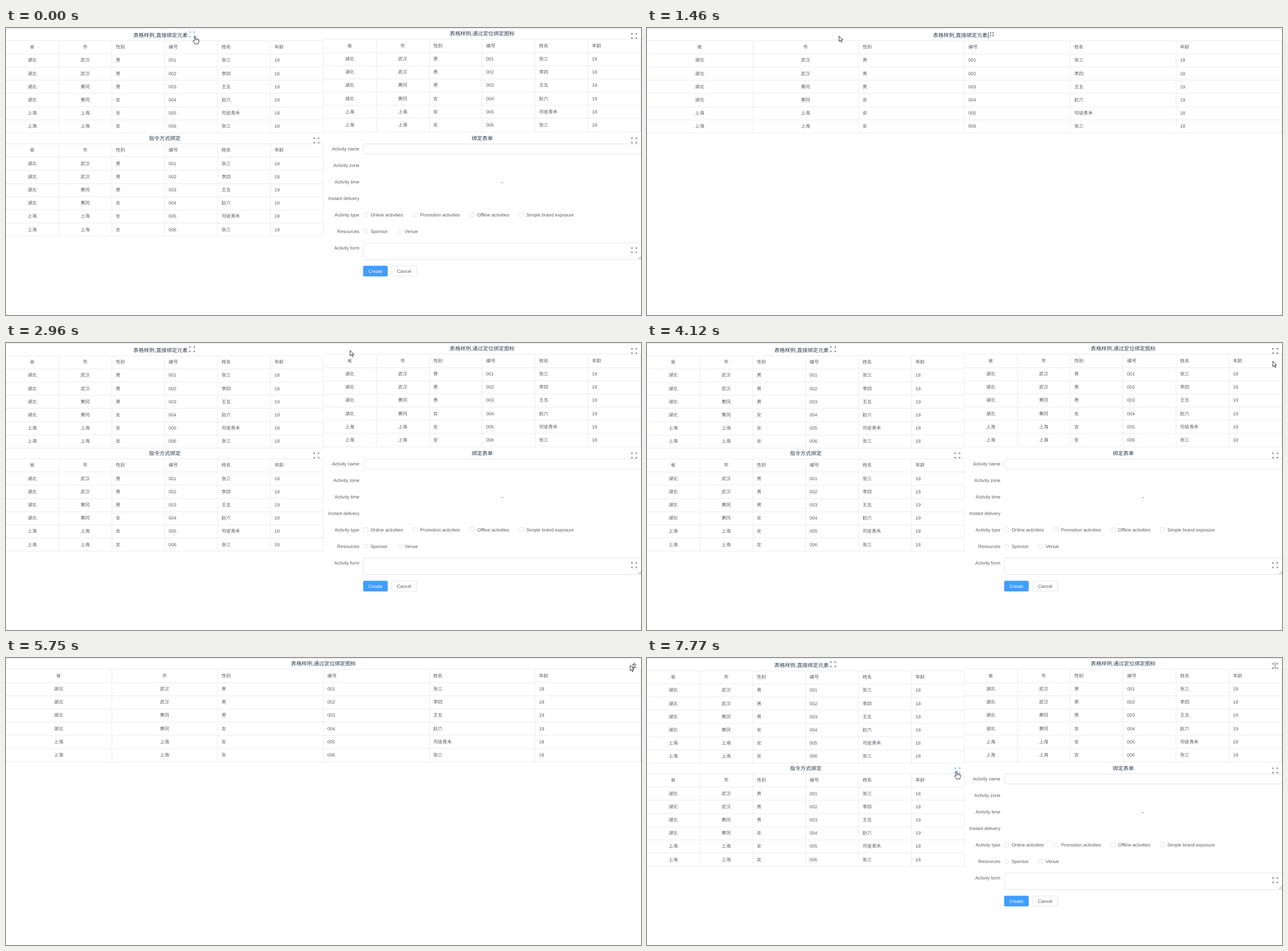
Recreate the animation shown at these times as an HTML page. Size 1112x504 px, loop 8000 ms.

```html
<!DOCTYPE html>
<html lang="zh-CN">
<head>
<meta charset="utf-8">
<title>Fullscreen panels</title>
<style>
  html, body { margin: 0; width: 100%; height: 100%; overflow: hidden; background: #fff; }
  svg { display: block; width: 1112px; height: 504px; }
  text {
    font: 8.1px "Liberation Sans", "Noto Sans CJK SC", "Noto Sans CJK", sans-serif;
    fill: #5a5d63; white-space: pre; text-rendering: geometricPrecision;
  }
  .title { font-size: 9.27px; fill: #2c3e50; }
  .mid { text-anchor: middle; }
  .end { text-anchor: end; }
  .white { fill: #fff; }
  .rule { fill: #ebedf1; }
  .box { fill: #fff; stroke: #dcdfe6; stroke-width: .8; }
  .icon { fill: none; stroke: #4a5868; stroke-width: .75; }
  .icon.hover { stroke: #409eff; }
  .cursor { fill: #fff; stroke: #222; stroke-width: .9; stroke-linejoin: round; }
  .cursor .crease { fill: none; stroke-width: .6; }
</style>
</head>
<body>
<svg id="stage" viewBox="0 0 1112 504"></svg>
<script>
const stage = document.getElementById('stage');

function add(parent, tag, attrs, text) {
  const el = document.createElementNS(stage.namespaceURI, tag);
  for (const k in attrs) el.setAttribute(k, attrs[k]);
  if (text) el.textContent = text;
  parent.append(el);
  return el;
}
const group = (parent = stage, attrs = {}) => add(parent, 'g', attrs);
const rect = (g, x, y, width, height, cls, extra) =>
  add(g, 'rect', { x, y, width, height, class: cls, ...extra });
// y is the visual middle of the line of text
const label = (g, x, y, text, cls = '') =>
  add(g, 'text', { x, y: y + (cls.includes('title') ? 3.2 : 2.7), class: cls }, text);

const EXPAND = 'M-4.6-2.4V-4.6H-2.4M-4.4-4.4L-2.3-2.3';
const SHRINK = 'M-1.5-3.7V-1.5H-3.7M-1.7-1.7L-4-4';
function icon(g, x, y, shape = EXPAND) {
  const el = group(g, { class: 'icon', transform: `translate(${x} ${y})` });
  for (let a = 0; a < 360; a += 90) add(el, 'path', { d: shape, transform: `rotate(${a})` });
  return { el, x, y };
}

const TABLE = `省 市 性别 编号 姓名 年龄
湖北 武汉 男 001 张三 18
湖北 武汉 男 002 李四 18
湖北 黄冈 男 003 王五 19
湖北 黄冈 女 004 赵六 19
上海 上海 女 005 司徒青禾 18
上海 上海 女 006 张三 18`.split('\n').map(row => row.split(' '));
const ROW_H = 23.17;

function table(g, left, top, width) {
  const col = width / 6;
  const lineY = i => Math.round(top + i * ROW_H);
  for (let i = 0; i <= 7; i++) rect(g, left, lineY(i), width, 1, 'rule');
  for (let i = 1; i <= 6; i++)
    rect(g, Math.floor(left + i * col - .2), lineY(0), 1, lineY(7) - lineY(0), 'rule');
  TABLE.forEach((row, r) => row.forEach((cell, c) => {
    const y = top + (r + .5) * ROW_H + .2;
    if (c < 2) label(g, left + (c + .5) * col - .5, y, cell, 'mid');
    else label(g, left + c * col + 6.8, y, cell);
  }));
}

function inlinePanel(g, width, shape) {
  label(g, width / 2 - 55, 12.5, '表格样例,直接绑定元素', 'title');
  table(g, 0, 21.7, width);
  return icon(g, width / 2 + 47.8, 11, shape);
}

function pinnedPanel(g, left, width, shape) {
  label(g, left + width / 2, 10, '表格样例,通过定位绑定图标', 'title mid');
  table(g, left, 19.4, width);
  return icon(g, 1100, 14, shape);
}

// Checkboxes or radios in a row, each as wide as its text
function choices(g, y, names, radius) {
  let x = 626;
  for (const name of names) {
    rect(g, x, y - 4.2, 7.6, 7.6, 'box', { rx: radius });
    x += 12.4 + label(g, x + 12.4, y, name).getComputedTextLength() + 17.4;
  }
}

function form(g) {
  const rowY = i => 212.3 + i * 29;
  label(g, 834, 193.5, '绑定表单', 'title mid');
  ['Activity name', 'Activity zone', 'Activity time', 'Instant delivery',
   'Activity type', 'Resources', 'Activity form']
    .forEach((s, i) => label(g, 618.8, rowY(i), s, 'end'));
  rect(g, 626, 203.5, 487, 17.6, 'box', { rx: 2.3 });
  label(g, 869, rowY(2), '-', 'title mid');
  choices(g, rowY(4), ['Online activities', 'Promotion activities',
    'Offline activities', 'Simple brand exposure'], 1.1);
  choices(g, rowY(5), ['Sponsor', 'Venue'], 3.8);
  rect(g, 626, 377.5, 487, 29.2, 'box', { rx: 2.3 });
  add(g, 'path', { d: 'M1107 406L1112 401M1110 406L1112 404', stroke: '#777', 'stroke-width': .7 });
  rect(g, 625.4, 417.5, 43.1, 18.7, '', { rx: 2.3, fill: '#409eff' });
  label(g, 647, 427, 'Create', 'mid white');
  rect(g, 675.5, 417.9, 43.8, 17.9, 'box', { rx: 2.3 });
  label(g, 697.3, 427, 'Cancel', 'mid');
  icon(g, 1100, 197.5);
  icon(g, 1100, 390.3);
}

rect(stage, 0, 0, 1112, 1, '', { fill: '#e2e4e8' });

const grid = { g: group(), caret: 318.3 };
label(grid.g, 278, 193.5, '指令方式绑定', 'title mid');
table(grid.g, 0, 203, 556);
form(grid.g);
grid.icons = [inlinePanel(grid.g, 556), pinnedPanel(grid.g, 556, 556), icon(grid.g, 543.5, 197.5)];

const inlineFull = { g: group(), caret: 597 };
inlineFull.icons = [inlinePanel(inlineFull.g, 1112, SHRINK)];
const pinnedFull = { g: group() };
pinnedFull.icons = [pinnedPanel(pinnedFull.g, 0, 1112, SHRINK)];

const caret = rect(stage, 0, 7.5, .9, 11, '', { fill: '#444' });
const flash = add(stage, 'circle', { r: 7.3, fill: '#ffee1c', opacity: .7 });
const arrow = group(stage, { class: 'cursor' });
add(arrow, 'path', { d: 'M0 0V9.5L2.2 7.5L3.7 10.9L5.3 10.2L3.8 6.9H6.8Z' });
const hand = group(stage, { class: 'cursor' });
add(hand, 'path', { d: 'M-1.3 8V1.2Q-1.3 0 -.2 0T.9 1.2V5Q2 4.2 3 5Q4.2 4.4 5 5.6Q6.4 5.2 6.6 6.6V9.4Q6.4 11 5.3 13.4H-.3Q-1 11.8-3.4 8.8Q-3.9 7.2-2.7 7.1Z' });
add(hand, 'path', { class: 'crease', d: 'M.9 5V7.4M3 5.2V7.4M5 5.8V7.6' });

// Pointer moves: start, end, x, y reached
const START = [331.3, 14.5];
const MOVES = [
  [70, 250, 338, 22],
  [440, 710, 331, 14],
  [1460, 2210, 602.7, 13],
  [3430, 4180, 1096, 32],
  [4270, 4490, 1097.3, 15],
  [4970, 5350, 899, 24],
  [5410, 5750, 1093, 13],
  [5810, 6050, 1097.3, 15.8],
  [6580, 7370, 534, 208],
  [7430, 7770, 542.3, 199]
];
// Press and release; each release switches to the next view
const CLICKS = [[1180, 1240], [2740, 2960], [4560, 4630], [6270, 6390]];
const VIEWS = [grid, inlineFull, grid, pinnedFull, grid];
const STEP = 62, BLINK = 530;

const ease = p => p * p * (3 - 2 * p);

function pointer(t) {
  let from = START;
  for (const [t0, t1, ...to] of MOVES) {
    if (t < t0) break;
    if (t < t1) {
      const done = (Math.floor((t - t0) / STEP) + 1) * STEP;
      const p = ease(Math.min(1, done / (t1 - t0)));
      return from.map((a, i) => a + (to[i] - a) * p);
    }
    from = to;
  }
  return from;
}

const show = (el, on) => el.setAttribute('visibility', on ? 'visible' : 'hidden');

function draw(t) {
  const view = VIEWS[CLICKS.filter(([, up]) => t >= up).length];
  for (const v of [grid, inlineFull, pinnedFull]) show(v.g, v === view);

  const [x, y] = pointer(t);
  let hovering = false;
  for (const { el, x: ix, y: iy } of view.icons) {
    const hit = Math.abs(x - ix) < 6.5 && Math.abs(y - iy) < 6.5;
    el.classList.toggle('hover', hit);
    hovering = hovering || hit;
  }
  show(hand, hovering);
  show(arrow, !hovering);
  for (const c of [hand, arrow]) c.setAttribute('transform', `translate(${x} ${y})`);

  show(flash, CLICKS.some(([down, up]) => t >= down && t < up));
  flash.setAttribute('cx', x);
  flash.setAttribute('cy', y);

  // the first click of each pair sets the text caret, which then keeps blinking
  const first = CLICKS[0][0], second = CLICKS[2][0];
  show(caret, t >= first && Math.floor((t - 1150) / BLINK) % 2 === 0);
  caret.setAttribute('x', t < second ? view.caret : 1099.5);
}

const began = performance.now();
function tick() {
  draw((performance.now() - began) % 8000);
  requestAnimationFrame(tick);
}
tick();
</script>
</body>
</html>
```
